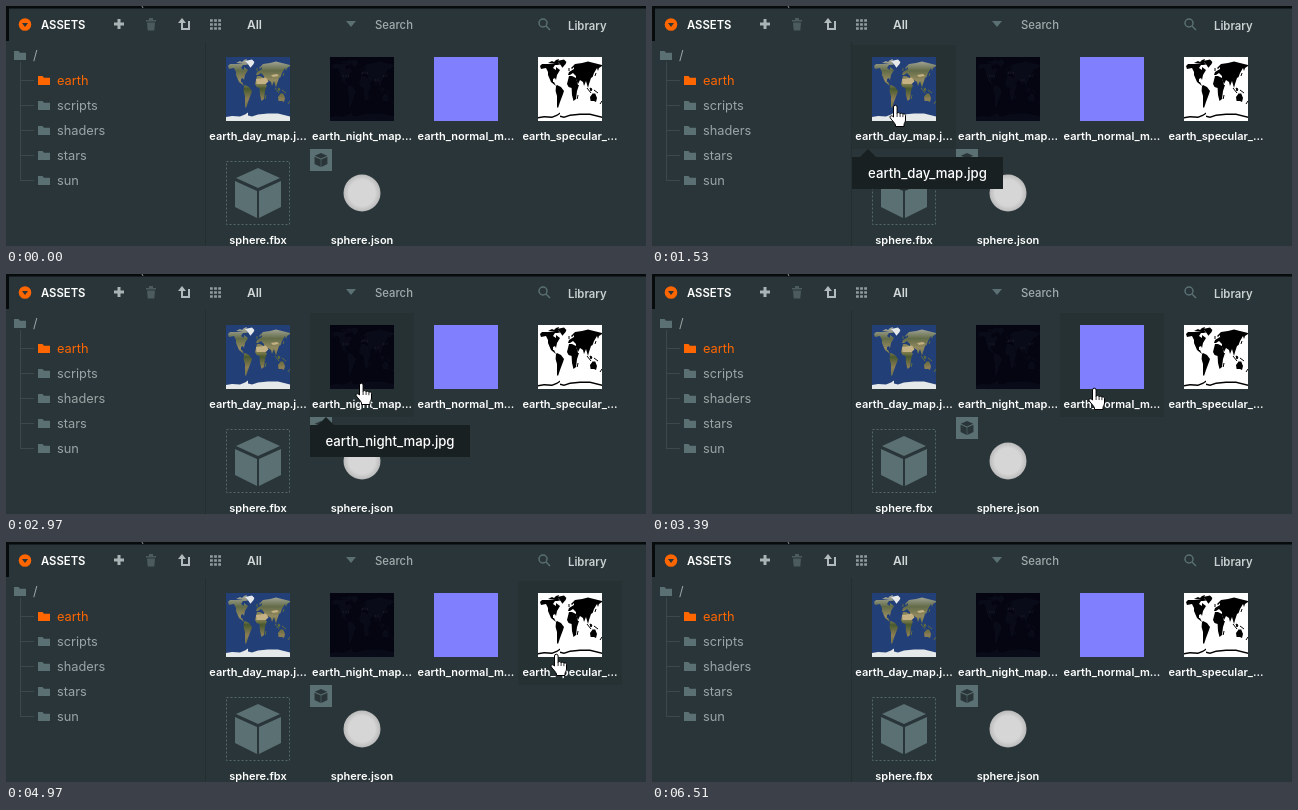
Write an HTML page that moves like this. It is 640 px wide and 240 px high and loops after 6540 ms.

```html
<!DOCTYPE html>
<html lang="en">
<head>
<meta charset="utf-8">
<title>Assets panel</title>
<style>
  html, body { margin: 0; width: 100%; height: 100%; overflow: hidden; background: #293538; }
  svg { display: block; }
  text { font-family: Inter, sans-serif; }
  .label { font-size: 11px; font-weight: 600; fill: #fff; text-anchor: middle; }
  .tree { font-size: 12.8px; fill: #9ba5a7; }
  .bar { font-size: 11.3px; font-weight: 600; fill: #fff; }
  .tip { font-size: 13.2px; font-weight: 500; fill: #fff; text-anchor: middle; }
</style>
</head>
<body>
<svg id="stage" width="640" height="240" viewBox="0 0 640 240">
  <defs>
    <linearGradient id="terrain" gradientUnits="userSpaceOnUse" x1="0" y1="4" x2="0" y2="52">
      <stop offset="0" stop-color="#a3a596"/>
      <stop offset=".2" stop-color="#626c48"/>
      <stop offset=".4" stop-color="#938a60"/>
      <stop offset=".5" stop-color="#77794a"/>
      <stop offset=".58" stop-color="#48592f"/>
      <stop offset=".8" stop-color="#8d7f54"/>
      <stop offset="1" stop-color="#697046"/>
    </linearGradient>
    <radialGradient id="ball">
      <stop offset=".7" stop-color="#d6d6d6"/>
      <stop offset="1" stop-color="#bababa"/>
    </radialGradient>
    <g id="land">
      <path d="M2 9L4 7 10 7 18 6 21 8 17 8 15 11 18 13 18 10 22 13 19 18 18 23 17 21 15 22 15 25 16 25 18 29 13 25 10 18 10 15 8 11 3 12z"/>
      <path d="M18 29L19 28 23 30 26 34 25 37 22 45 20 51 19 50 19 39 17.6 34z"/>
      <path d="M31 19L34 19 38 21 40 28 41 28 39 34 38 42 35.5 44 34 38 33.6 31 30.6 30 29 27z"/>
      <path d="M30 18L31 15 36 12 36 10 34 12 33 11 37 7 44 6 50 4.6 64 8 64 9 61 11 60 14 59 11 56 16 54.6 20 53 21 51 27 50 31 48 24 46 29 45 25 42 23 40 27 38 22 38 19 35 16 32 18z"/>
      <path d="M52 40L55 36 56 37 57 36 59 41 58 45 56 44 52.6 44z"/>
      <path d="M10 6l4-2 2 1 2-2 3-1-1 3 2 3-4-1-3-1z"/>
      <path d="M49 31l4 5M52 31l2 1-1 2zM56 33l4 3M40 38l-.8 4M31 14v-3M57 19l1-3M62 47l2-3" stroke="currentColor"/>
    </g>
    <path id="greenland" d="M19 4L26 2.5 28.4 5 27.6 7 24.4 10.7 22.6 8z"/>
    <path id="polar" d="M0 60l6-1 8 .5 5-2 3-2v3l4 1 6-2 10-1 10 0 8 2 4 1v5H0z"/>
    <path id="folder" d="M0 0h4.500l1.500 1.800h6V9H0z"/>
    <path id="cube" d="M0-25L22-15 0-5-22-15zM-23-12L-1-2V25l-22-11zM23-12L1-2V25l22-11z"/>
  </defs>

  <path d="M0 0h640v2.500H3V35H0z" fill="#080b0c"/>
  <path d="M136 0l1 2" stroke="#8d9395"/>
  <path d="M199.500 36v204" stroke="#232e31"/>

  <circle cx="19" cy="18.500" r="6.300" fill="#f60"/>
  <path d="M16 17h6l-3 4z" fill="#293538"/>
  <text class="bar" x="35" y="23">ASSETS</text>
  <path d="M113 13v10M108 18h10" stroke="#a9b4b6" stroke-width="3"/>
  <path d="M140 14h10v1.500h-10zM143 12h4v2h-4zM141 16.500h8l-.7 8h-6.600z" fill="#4c5b5e"/>
  <path d="M176 15v8h7v-8" fill="none" stroke="#b1babc" stroke-width="2"/>
  <path d="M172 17l4-5 4 5z" fill="#b1babc"/>
  <path d="M204 14.500h11M204 18.500h11M204 22.500h11" stroke="#8f9c9e" stroke-width="2.600" stroke-dasharray="2.800 1.300"/>
  <text class="bar" x="241" y="23" style="font-size:12px;fill:#d3d8d9">All</text>
  <path d="M340 15h10l-5 6z" fill="#5b7073"/>
  <text x="369" y="23" font-size="11.300" font-weight="500" fill="#a1abad">Search</text>
  <g fill="none" stroke="#5b7073" stroke-width="1.500">
    <circle cx="537" cy="17" r="4"/><path d="M540 20l4 4"/>
  </g>
  <text class="bar" x="562" y="24" style="fill:#c9d0d1">Library</text>

  <g id="tree">
    <path d="M14.500 56v118.500" stroke="#3b494c"/>
    <use href="#folder" x="8" y="45" fill="#5b7073"/>
    <text class="tree" x="27" y="53.500">/</text>
  </g>

  <rect id="hover" width="104" height="104" fill="#263134"/>

  <svg x="220" y="51" width="64" height="64">
    <rect width="64" height="64" fill="#223f78"/>
    <use href="#land" fill="url(#terrain)" color="#5f6d3e"/>
    <path d="M30 22l8-1 2-.5 2.500 4-3 2.500-9 0zM45 18l6-1 2 2-6 1z" fill="#c4b184"/>
    <g fill="#e6e9e9"><use href="#greenland"/><use href="#polar"/></g>
  </svg>
  <svg x="324" y="51" width="64" height="64">
    <rect width="64" height="64" fill="#040510"/>
    <g fill="#090b19" color="#090b19"><use href="#land"/><use href="#greenland"/><use href="#polar"/></g>
    <path d="M13 19h6M32 16h6M45 23h4M53 19h4" stroke="#282431" stroke-dasharray="1 1.500"/>
  </svg>
  <rect x="428" y="51" width="64" height="64" fill="#8080ff"/>
  <svg x="532" y="51" width="64" height="64">
    <rect width="64" height="64" fill="#fff"/>
    <use href="#land"/><use href="#greenland"/>
    <use href="#polar"/>
    <use href="#polar" y="1.500" fill="#fff"/>
  </svg>

  <rect x="220.500" y="155.500" width="63" height="63" fill="none" stroke="#53676a" stroke-dasharray="2"/>
  <use href="#cube" x="252" y="187" fill="#5b7073"/>
  <circle cx="356" cy="187" r="18.500" fill="url(#ball)"/>
  <rect x="304" y="143" width="22" height="22" fill="#5b7073"/>
  <use href="#cube" transform="translate(315 154) scale(.28)" fill="#293538"/>
  <g id="labels"></g>

  <g id="tip">
    <path fill="#192022"/>
    <text class="tip" y="172"></text>
  </g>
  <g id="hand" stroke="#000" stroke-linejoin="round">
    <path fill="#fff" d="M4.500 13V3a1.800 1.800 0 0 1 3.600 0V9.500a1.600 1.600 0 0 1 3 .3 1.600 1.600 0 0 1 2.800.6 1.500 1.500 0 0 1 2.600 1V16c0 2-1.500 3-1.500 5v1.500H6.500V21C5.500 18.500 3.500 17 1.200 13.800c-.9-1.500 1-2.700 2.200-1.600z"/>
    <path d="M8.100 9.500v3.500M11.100 10v3M13.900 10.700v2.500" stroke-width=".8"/>
  </g>
</svg>
<script>
const LOOP = 6540, CELL = 104, LEFT = 200, TOP = 39;
const $ = id => document.getElementById(id);

['earth', 'scripts', 'shaders', 'stars', 'sun'].forEach((name, i) => {
  const y = 74.5 + i * 25, active = i === 0;
  $('tree').insertAdjacentHTML('beforeend',
    `<path d="M14 ${y}h14" stroke="#3b494c"/>
     <use href="#folder" x="32" y="${y - 4.5}" fill="${active ? '#f60' : '#5b7073'}"/>
     <text class="tree" x="51" y="${y + 4.5}" ${active ? 'style="fill:#f60"' : ''}>${name}</text>`);
});

const labels = ['earth_day_map.j...', 'earth_night_map...', 'earth_normal_m...',
  'earth_specular_...', 'sphere.fbx', 'sphere.json'];
$('labels').innerHTML = labels.map((name, i) =>
  `<text class="label" x="${LEFT + CELL * (i % 4 + .5)}" y="${i < 4 ? 134 : 238}">${name}</text>`).join('');

const tips = [
  { name: 'earth_day_map.jpg', x: 200, width: 151, from: 610, to: 1620 },
  { name: 'earth_night_map.jpg', x: 304, width: 160, from: 2180, to: 3210 },
  { name: 'earth_normal_map.jpg', x: 337, width: 175, from: 3580, to: 4800, right: true },
  { name: 'earth_specular_map.jpg', x: 435, width: 181, from: 5160, to: 6390, right: true },
];

// Pointer path: time, x, y
const keys = [
  [30, 262, 238], [200, 256, 190], [450, 238, 103], [640, 238, 99], [710, 238, 99],
  [760, 237, 98], [1530, 237, 98], [1750, 281, 103], [1980, 349, 108], [2960, 349, 108],
  [3390, 436, 113], [3590, 447, 115], [4600, 447, 115], [4970, 544, 111],
  [5250, 556, 113], [6260, 556, 113], [6510, 642, 122],
];

// Slope at a key; zero wherever the pointer rests
function slope(i, axis) {
  const a = keys[i - 1], b = keys[i], c = keys[i + 1];
  if (!a || !c || a[axis] === b[axis] || b[axis] === c[axis]) return 0;
  return (c[axis] - a[axis]) / (c[0] - a[0]);
}

function pointerAt(t, axis) {
  const i = keys.findIndex((k, n) => n && t <= k[0]) - 1;
  const a = keys[i], b = keys[i + 1], span = b[0] - a[0], u = (t - a[0]) / span;
  const ease = u * u * (3 - 2 * u);
  return a[axis] + (b[axis] - a[axis]) * ease
    + span * u * (1 - u) * (slope(i, axis) * (1 - u) - slope(i + 1, axis) * u);
}

function show(el, visible) {
  el.setAttribute('visibility', visible ? 'visible' : 'hidden');
}

function draw() {
  const t = performance.now() % LOOP;
  const present = t >= 30 && t < 6510;
  show($('hand'), present);
  let hovering = false;
  if (present) {
    const x = Math.round(pointerAt(t, 1)), y = Math.round(pointerAt(t, 2));
    $('hand').setAttribute('transform', `translate(${x} ${y})`);
    const col = Math.floor((x + 6 - LEFT) / CELL), row = Math.floor((y + 1 - TOP) / CELL);
    hovering = col < (row ? 2 : 4);
    $('hover').setAttribute('x', LEFT + col * CELL);
    $('hover').setAttribute('y', TOP + row * CELL);
  }
  show($('hover'), hovering);

  const tip = tips.find(p => t >= p.from && t < p.to);
  show($('tip'), tip);
  if (tip) {
    const [box, text] = $('tip').children;
    const arrow = tip.x + (tip.right ? tip.width - 24 : 8);
    box.setAttribute('d', `M${tip.x} 151H${arrow}l8-8 8 8H${tip.x + tip.width}v32H${tip.x}z`);
    text.setAttribute('x', tip.x + tip.width / 2);
    text.textContent = tip.name;
  }
  requestAnimationFrame(draw);
}
draw();
</script>
</body>
</html>
```
